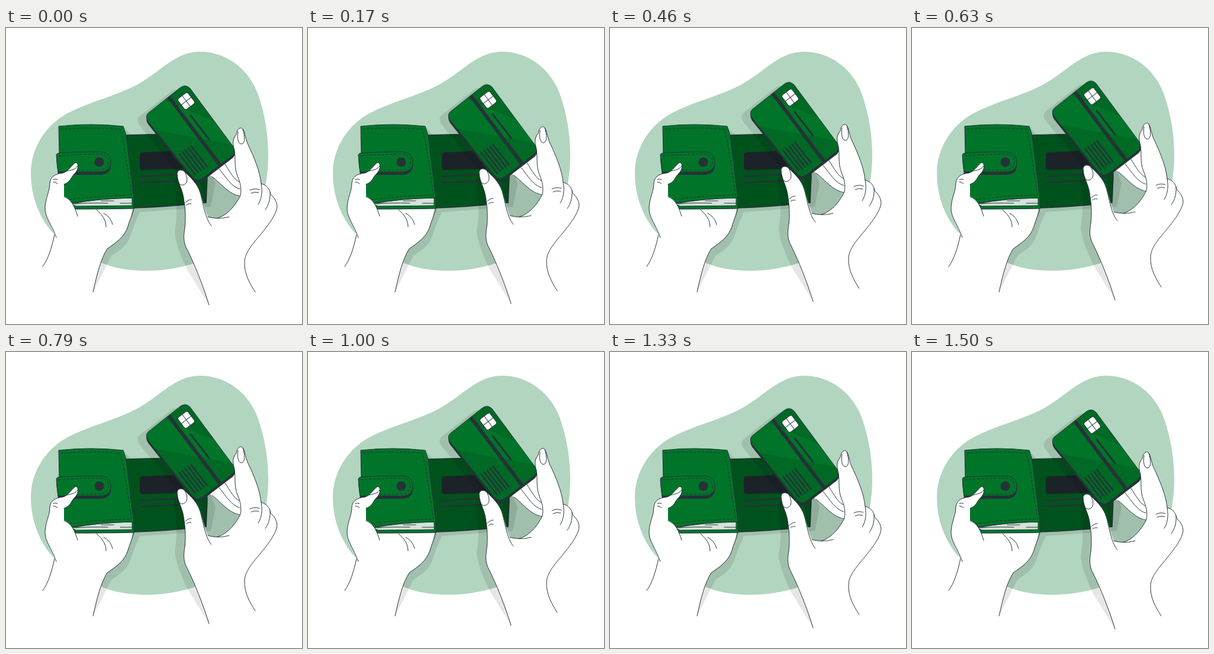
These frames come from a looping animation (500x500 px, 1.54 s). An HTML page without scripts:

```html
<!DOCTYPE html>
<html lang="en">
<head>
<meta charset="utf-8">
<title>Wallet and card</title>
<style>
  html, body { margin: 0; width: 100%; height: 100%; overflow: hidden; background: #fff; }
  svg { display: block; width: 100%; height: 100%; }
  .line { fill: none; stroke: #263238; stroke-linecap: round; stroke-linejoin: round; }
  .skin { fill: #fff; }
  .green { fill: #007529; stroke: #263238; stroke-linejoin: round; }
  .dark { fill: #263238; }
  .shade { opacity: .1; }
  .seam { fill: none; stroke: #263238; stroke-dasharray: 4.5 2.5; }
  .bar { fill: none; stroke: #263238; }

  /* 37 steps per loop: 17 up, a hold, 17 down, a hold */
  .lift { animation: lift 1540ms infinite; }
  @keyframes lift {
    0% { transform: translateY(0); animation-timing-function: steps(17); }
    45.946% { transform: translateY(-9.44px); animation-timing-function: linear; }
    48.649% { transform: translateY(-9.44px); animation-timing-function: steps(17); }
    94.595%, 100% { transform: translateY(0); }
  }
</style>
</head>
<body>
<svg viewBox="0 0 500 500">
  <defs>
    <path id="card" d="M241 143L294 101Q303 94 311 102L385 202Q389 209 383 215L332 254Q323 261 315 252L240 158Q234 149 241 143Z"/>
    <path id="strap" d="M85 214Q86 211 91 211Q130 209 160 209C172 210 178 218 177 229C176 238 169 243 159 243L88 243Q86 230 85 214Z"/>
    <path id="bar" class="bar" stroke-width="2.5" d="M292 212L320 248"/>
    <clipPath id="face"><use href="#card"/></clipPath>
  </defs>

  <path fill="#b2d5bf" d="M327 40C373 40 411 70 426 113C438 148 443 182 443 215C443 260 433 305 405 340C365 386 305 410 236 410C205 410 182 405 162 397C130 385 103 370 82 349C56 322 42 284 42 245C42 203 67 164 104 144C142 124 182 116 219 97C258 77 285 40 327 40Z"/>

  <!-- left palm and wallet shadows -->
  <path class="shade" d="M147 446L178 385C193 375 206 366 211 349C215 335 221 322 226 311L346 302L354 262L330 200L208 178L198 166L180 300L160 390Z"/>
  <path class="skin" d="M62 403C71 391 77 372 82 349L97 280H216C214 315 210 322 206 335C200 354 185 362 171 373C160 390 154 415 147 446Z"/>
  <g class="line">
    <path d="M62 403C71 391 77 372 82 349"/>
    <path d="M216 305C213 317 209 324 206 335C200 354 185 363 171 373C160 390 154 415 147 446"/>
    <path d="M153 307C163 316 169 324 169 336M165 313C174 318 178 324 180 332"/>
  </g>

  <!-- wallet -->
  <path fill="#00521d" stroke="#263238" stroke-width="1.5" d="M203 181Q270 178 336 181L340 250L338 295Q275 302 216 304Z"/>
  <path fill="#1c2328" d="M231 210L300 207V238L231 240Q226 240 226 235V215Q226 210 231 210Z"/>
  <path class="bar" stroke-width="2.6" d="M226 251L300 247M226 261L300 258"/>
  <path class="green" d="M97 285L216 287V305Q160 306 116 306Z"/>
  <path fill="#d3e3d9" stroke="#263238" d="M111 297Q155 288 213 287V300L118 301Z"/>
  <path class="line" d="M116 297Q140 295 172 296M161 292L182 292M193 296L213 296"/>
  <path class="green" d="M89 166Q143 160 198 166L203 181L216 287Q155 288 111 296L97 287V244L90 214Z"/>
  <path class="seam" d="M92 171Q143 167 193 171L199 196L212 282Q150 284 106 290"/>
  <use href="#strap" class="dark" y="5"/>
  <use href="#strap" class="green"/>
  <path class="seam" d="M89 216Q130 213 160 213Q174 215 173 228Q171 239 158 240L122 240"/>
  <circle class="dark" cx="157.500" cy="226.500" r="8"/>

  <!-- left thumb -->
  <path class="skin" d="M83 352C76 331 65 319 66 303C67 286 74 276 74 262C75 250 85 246 96 245C105 243 112 230 118 227C124 229 122 240 116 246C109 252 110 260 98 264V284C110 289 116 301 121 318L100 352Z"/>
  <g class="line">
    <path d="M85 354C77 331 65 319 66 303C67 286 74 276 74 262C75 250 85 246 96 245C105 243 112 230 118 227C124 229 122 240 116 246C109 252 110 260 98 264M98 285C110 289 116 301 121 318"/>
    <path d="M101 242C110 240 118 239 121 233M80 256Q84 254 87 256M80 260Q84 260 87 263"/>
  </g>

  <g class="lift">
    <g class="shade">
      <use href="#card" x="-15" y="6"/>
      <path d="M289 247L283 262L288 300Q289 320 285 345Q286 366 306 408L343 468L320 330ZM325 245L400 240V290L360 326H340Z"/>
    </g>

    <!-- fingers behind the card -->
    <path class="skin" d="M345 246L385 208L397 250V285C378 282 365 264 345 249Z"/>
    <path class="line" d="M348 251C365 264 376 281 396 284M360 238C371 251 380 268 395 272M370 230C378 243 386 257 394 260"/>

    <!-- card -->
    <use href="#card" class="dark" y="4.500"/>
    <use href="#card" class="green"/>
    <g clip-path="url(#face)">
      <path class="shade" d="M262 120L370 165L400 170V80H262ZM230 168L400 200V270H230Z"/>
      <path class="bar" stroke-width="6" d="M273 114L368 240"/>
    </g>
    <path class="bar" stroke-width="3" stroke-linecap="round" d="M312 148L343 188"/>
    <use href="#bar"/>
    <use href="#bar" x="5" y="-3.400"/>
    <use href="#bar" x="10" y="-6.800"/>
    <use href="#bar" x="15" y="-10.200"/>
    <use href="#bar" x="20" y="-13.600"/>
    <g transform="translate(304.500 123.500) rotate(-37)" fill="#fff" stroke="#263238">
      <rect x="-10.500" y="-11.500" width="21" height="23" rx="3.500"/>
      <path d="M0 -11.500V11.500M-10.500 0H10.500"/>
    </g>

    <!-- right hand -->
    <path class="skin" d="M343 468C333 435 318 398 306 374C299 362 300 350 302 338C304 322 303 305 300 287C298 272 290 262 289 247C289 239 297 238 302 243C311 252 323 262 328 278C333 294 336 308 341 319Q349 322 357 321C373 317 387 301 396 283C398 271 396 262 391 250C385 235 388 221 386 207C383 196 382 188 389 180C390 172 394 168 398 169C403 171 404 186 408 195C419 218 429 242 431 263C440 265 446 272 447 281C455 288 460 298 457 307C452 322 441 335 430 349C418 363 403 380 403 395C402 415 412 432 421 446Z"/>
    <g class="line">
      <path d="M343 468C333 435 318 398 306 374C299 362 300 350 302 338C304 322 303 305 300 287C298 272 290 262 289 247C289 239 297 238 302 243C311 252 323 262 328 278C333 296 337 324 347 334"/>
      <path d="M289 248C289 260 293 267 300 265C308 262 307 252 302 243M303 295Q307 290 313 290M305 299Q308 296 313 297"/>
      <path d="M341 319Q358 324 377 319M357 321C373 317 387 301 396 283C398 271 396 262 391 250C385 235 388 221 386 207C383 196 382 188 389 180C390 172 394 168 398 169C403 171 404 186 408 195C419 218 429 242 431 263C440 265 446 272 447 281C455 288 460 298 457 307C452 322 441 335 430 349C418 363 403 380 403 395C402 415 412 432 421 446"/>
      <path d="M392 175C390 186 392 196 398 196C404 195 404 183 400 171M412 274Q420 270 428 273M414 279Q420 276 427 278M431 263C434 278 431 290 426 298M446 277C447 290 443 300 438 307"/>
    </g>
  </g>
</svg>
</body>
</html>
```
